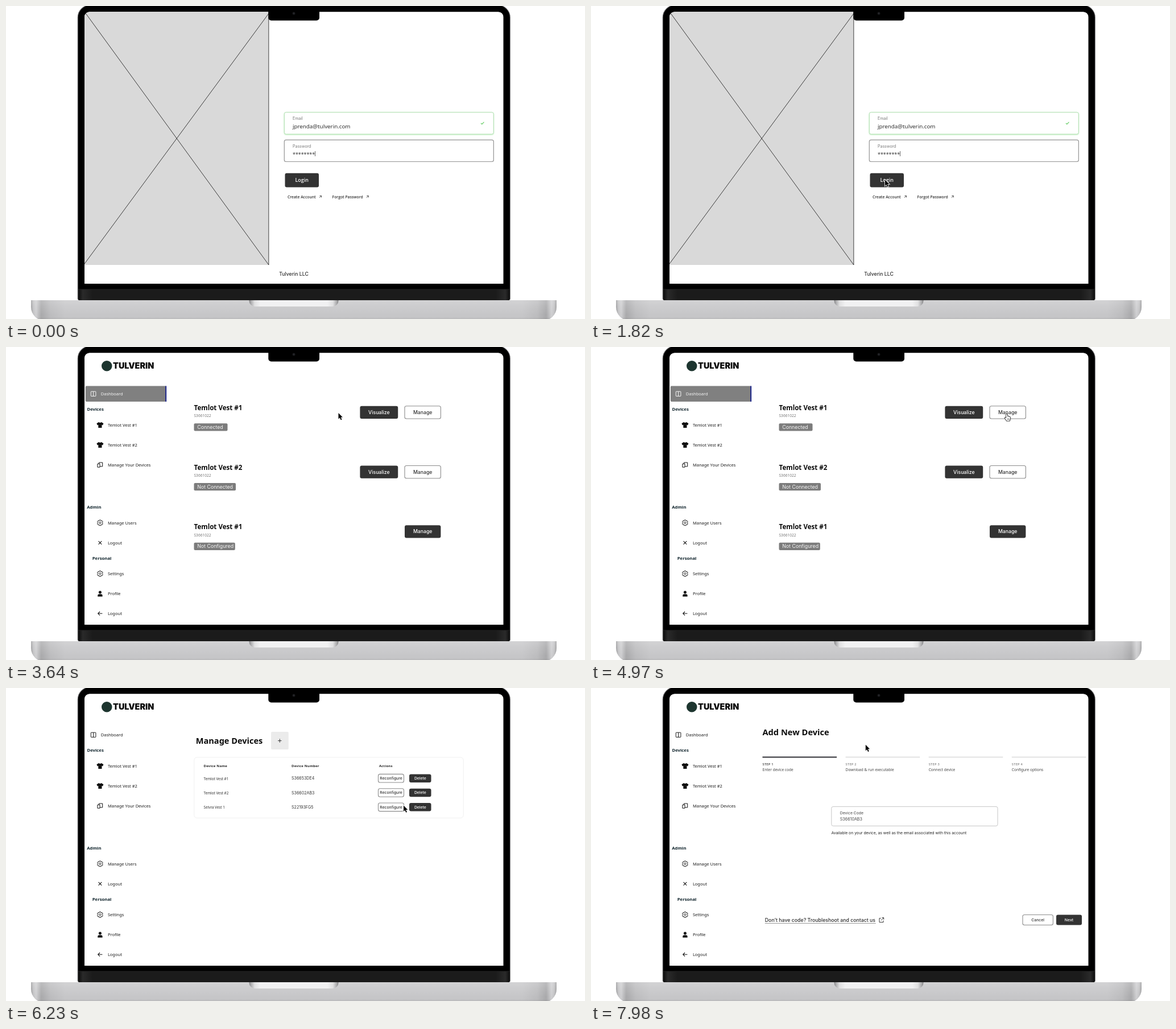
Recreate the animation shown at these times as an HTML page with a canvas. Size 1018 px wide and 550 px high, loop 8000 ms.

```html
<!DOCTYPE html>
<html lang="en">
<head>
<meta charset="utf-8">
<title>Device portal walkthrough</title>
<style>
html, body { margin: 0; width: 100%; height: 100%; overflow: hidden; background: #fff; }
canvas { display: block; width: 1018px; height: 550px; }
</style>
</head>
<body>
<canvas id="stage"></canvas>
<script>
const W = 1018, H = 550, LOOP = 8000, STEP = 70;
const canvas = document.getElementById('stage');
const ctx = canvas.getContext('2d');
const dpr = window.devicePixelRatio || 1;
canvas.width = W * dpr;
canvas.height = H * dpr;

const NOTO = '"Noto Sans", "Open Sans", sans-serif';
const OPEN = '"Open Sans", "Noto Sans", sans-serif';
const INTER = 'Inter, "Liberation Sans", sans-serif';
const DARK = '#333', INK = '#1c1c1c';
const VEST = 'Temlot Vest';

// ---- helpers ----
function text(str, x, y, size, { font = NOTO, weight = 400, color = INK, align = 'left', gap = 0 } = {}) {
  ctx.font = `${weight} ${size}px ${font}`;
  ctx.fillStyle = color;
  ctx.textAlign = align;
  ctx.letterSpacing = gap + 'px';
  ctx.fillText(str, x, y);
}

function box(x, y, w, h, r, fill, stroke, line = 1) {
  ctx.beginPath();
  ctx.roundRect(x, y, w, h, r);
  if (fill) { ctx.fillStyle = fill; ctx.fill(); }
  if (stroke) { ctx.strokeStyle = stroke; ctx.lineWidth = line; ctx.stroke(); }
}

function path(d, x, y, { fill, stroke, line = 1 } = {}) {
  const p = new Path2D(d);
  ctx.save();
  ctx.translate(x, y);
  if (stroke) { ctx.strokeStyle = stroke; ctx.lineWidth = line; ctx.stroke(p); }
  if (fill) { ctx.fillStyle = fill; ctx.fill(p); }
  ctx.restore();
}

// Horizontal gradient whose stops are mirrored about the middle.
function mirrored(x, w, stops) {
  const g = ctx.createLinearGradient(x, 0, x + w, 0);
  for (const [d, c] of stops) {
    g.addColorStop(d / w, c);
    g.addColorStop(1 - d / w, c);
  }
  return g;
}

function button(label, x, y, w, h, size, solid) {
  box(x, y, w, h, 3, solid ? DARK : '#fff', solid ? null : '#8c8c8c', 1.1);
  text(label, x + w / 2, y + h / 2 + size * 0.365, size,
    { font: INTER, weight: 500, color: solid ? '#fff' : DARK, align: 'center' });
}

// ---- laptop ----
function base() {
  const shape = [0, 0, 24, 24];
  box(44, 517, 924, 36, shape, mirrored(44, 924,
    [[0, '#98989a'], [4, '#c2c2c4'], [9, '#cfcfd1'], [18, '#a9a9ab'], [34, '#bcbcbe'], [60, '#c6c6c8']]));
  const v = ctx.createLinearGradient(0, 517, 0, 552);
  v.addColorStop(0, 'rgba(255,255,255,.22)');
  v.addColorStop(0.35, 'rgba(255,255,255,.1)');
  v.addColorStop(0.75, 'rgba(255,255,255,0)');
  v.addColorStop(1, 'rgba(0,0,0,.12)');
  box(44, 517, 924, 36, shape, v);
  box(427.5, 517, 157, 11, [0, 0, 10, 10], mirrored(427, 158,
    [[0, '#777'], [3, '#a5a5a7'], [10, '#e0e0e1'], [20, '#f1f1f2']]));
}

function lid() {
  box(125.7, -2, 761.1, 519, [22, 22, 3, 3], '#6f6f70');
  box(126.8, -1, 759, 518, [21, 21, 3, 3], '#000');
  box(127, 498, 758.5, 19, [0, 0, 3, 3], mirrored(127, 759, [[0, '#0b0b0b'], [8, '#2a2a2a'], [25, '#1b1b1b']]));
  box(127, 497.4, 758.5, 0.8, 0, '#2a2a2a');
  box(138, 10.2, 736.5, 477.8, [9, 9, 0, 0], '#fff');
}

function notch() {
  box(461.3, 6, 89.7, 19.5, [0, 0, 5, 5], '#000');
  box(503.5, 10.5, 5, 5, 2.5, '#191a1c');
  box(505, 12, 2, 2, 1, '#2c2d33');
}

// ---- login ----
function login() {
  ctx.save();
  ctx.beginPath();
  ctx.roundRect(138, 10.2, 736.5, 477.8, [9, 9, 0, 0]);
  ctx.clip();
  box(138, 10, 324, 445, 0, '#d9d9d9');
  path('M0 0L324 445M0 443L324 3M323.9 0V445', 138, 10, { stroke: '#111', line: 0.8 });
  ctx.restore();

  ctx.save();
  ctx.shadowColor = 'rgba(100,215,100,.5)';
  ctx.shadowBlur = 2.5 * dpr;
  ctx.shadowOffsetY = dpr;
  box(489.3, 186.8, 368, 38.4, 3, '#fff');
  ctx.restore();
  box(489.3, 186.8, 368, 38.4, 3, '#fff', '#a9dca9', 1);
  box(489.3, 235.3, 368, 38.2, 3, '#fff', '#939393', 1.2);

  const label = { font: INTER, color: '#777' };
  text('Email', 504, 200.4, 7, label);
  text('Password', 504, 248.7, 7, label);
  text('jprenda@tulverin.com', 504, 214.9, 9.75, { color: '#303030' });
  text('********', 504, 264.3, 8.9, { color: '#333', weight: 500 });
  box(543, 255, 0.8, 9, 0, '#444');
  path('M0 2.2L1.8 4L5.4 .2', 835, 203.6, { stroke: '#5fcb5f', line: 1.1 });

  box(490.5, 293.8, 59.5, 24.6, 3, DARK);
  text('Login', 520.2, 309.2, 8.9, { font: OPEN, color: '#fff', weight: 600, align: 'center' });
  const link = { font: OPEN, color: '#333', weight: 600 };
  text('Create Account', 495, 337.9, 6.75, link);
  text('Forgot Password', 573.6, 337.9, 6.75, link);
  for (const x of [551, 633.8])
    path('M0 3.6L3.4 .3M.5 .2H3.5V3.3', x, 333.3, { stroke: '#333', line: 0.8 });
  text('Tulverin LLC', 506, 473.8, 8.7, { font: INTER, weight: 500, color: '#2b2b2b', align: 'center' });
}

// ---- sidebar ----
const SHIRT = 'M-2.2 -5Q0 -3.2 2.2 -5L6 -2.7L4.7 .4L3.1 -.2V5H-3.1V-.2L-4.7 .4L-6 -2.7Z';
const icons = {
  shirt: (x, y) => path(SHIRT, x, y, { fill: '#111' }),
  devices: (x, y) => path('M-2 -4.2H4.3V2.7H-.3M-4.5 -1.9H-.4V4H-4.5ZM-2 -4.2V-2', x, y, { stroke: '#111' }),
  gear(x, y) {
    path('M-1.3 -4.8H1.3L1.8 -3.3L3.6 -3.6L4.8 -1.4L3.7 0L4.8 1.4L3.6 3.6L1.8 3.3L1.3 4.8H-1.3L-1.8 3.3L-3.6 3.6L-4.8 1.4L-3.7 0L-4.8 -1.4L-3.6 -3.6L-1.8 -3.3Z',
      x, y, { stroke: '#151515' });
    box(x - 1.6, y - 1.6, 3.2, 3.2, 1.6, null, '#151515', 0.9);
  },
  cross: (x, y) => path('M-2.8 -2.8L2.8 2.8M2.8 -2.8L-2.8 2.8', x, y, { stroke: '#151515', line: 1.1 }),
  person(x, y) {
    box(x - 2.5, y - 5, 5, 5, 2.5, '#111');
    box(x - 4.2, y + 0.7, 8.4, 4.2, [2.5, 2.5, 0.5, 0.5], '#111');
  },
  back: (x, y) => path('M4 0H-3.6M-.4 -3.3L-3.7 0L-.4 3.3', x, y, { stroke: '#151515', line: 1.1 })
};
const menu = [
  ['shirt', VEST + ' #1', 136.8], ['shirt', VEST + ' #2', 171.9], ['devices', 'Manage Your Devices', 207],
  ['gear', 'Manage Users', 308.7], ['cross', 'Logout', 343.8], ['gear', 'Settings', 398.1],
  ['person', 'Profile', 433.3], ['back', 'Logout', 468.1]
];

function sidebar(active) {
  box(168, 24, 18.5, 18.5, 9.25, '#1d352f');
  text('TULVERIN', 188, 38.4, 14.4, { font: INTER, weight: 900, color: '#0b0b0b' });
  if (active) {
    box(139.7, 68.5, 142, 27.5, 2, '#808080');
    box(280, 68.5, 2.2, 27.5, 0, '#27308c');
  }
  const c = active ? '#f4f4f4' : INK;
  box(149.3, 78.2, 8.6, 8.2, 0.5, null, c, 1);
  path('M0 0V8.2', 153.6, 78.2, { stroke: c });
  text('Dashboard', 166.8, 85.1, 7.5, { color: c });
  for (const [icon, label, y] of menu) {
    icons[icon](165.4, y + 0.2);
    text(label, 178.9, y + 2.8, 7.5);
  }
  const head = { weight: 700, color: '#10242c' };
  text('Devices', 142.4, 112.4, 7.75, head);
  text('Admin', 142.2, 284.2, 7.75, head);
  text('Personal', 151.7, 373.7, 7.75, head);
}

// ---- pages ----
function dashboard() {
  sidebar(true);
  const rows = [['#1', 'Connected', 59], ['#2', 'Not Connected', 73.5], ['#1', 'Not Configured', 72.3]];
  rows.forEach(([num, state, w], i) => {
    const y = i * 104.7;
    text(`${VEST} ${num}`, 330.5, y + 111, 11.6, { weight: 700, color: '#0c0c0c' });
    text('S3661022', 330.5, y + 123.4, 6.6, { color: '#777' });
    box(330.5, y + 134.3, w, 13.2, 2, '#7c7c7c');
    text(state, 336.2, y + 144, 8.8, { font: INTER, color: '#f4f4f4' });
    if (i < 2) button('Visualize', 622.4, y + 103.8, 66.8, 22.2, 8.7, true);
    button('Manage', 701, y + 103.8, 63.4, 22.2, 8.7, i === 2);
  });
}

function devices() {
  sidebar(false);
  text('Manage Devices', 333.8, 98, 14.55, { weight: 700, color: '#0c0c0c' });
  box(466, 77, 30.8, 31, 2, '#ebebeb');
  path('M-3.2 0H3.2M0 -3.2V3.2', 481.3, 92.6, { stroke: '#222', line: 0.9 });
  box(330.8, 121.8, 473.4, 106.6, 5, '#fff', '#f0f0f0');
  const head = { weight: 700, color: '#222', gap: 0.2 };
  text('Device Name', 347.6, 139, 6, head);
  text('Device Number', 502, 139, 6, head);
  text('Actions', 656, 139, 6, head);
  const rows = [[VEST + ' #1', 'S36653DE4'], [VEST + ' #2', 'S36602AB3'], ['Selvra Vest 1', 'S22193FG5']];
  rows.forEach(([name, code], i) => {
    const y = 158.7 + i * 25.3;
    text(name, 347.6, y + 3, 6.3, { color: '#333' });
    text(code, 502, y + 2.5, 7.1, { font: INTER, color: '#333' });
    button('Reconfigure', 654.5, y - 7.3, 45, 14.6, 6.75, false);
    button('Delete', 709, y - 7.3, 38.5, 14.6, 6.75, true);
  });
}

function addDevice() {
  sidebar(false);
  text('Add New Device', 301.5, 82.8, 14.65, { weight: 700, color: '#0c0c0c' });
  const steps = ['Enter device code', 'Download & run executable', 'Connect device', 'Configure options'];
  steps.forEach((label, i) => {
    const x = 301.5 + i * 146.1;
    box(x, 120.4, 130.6, 2, 0, i ? '#e2e2e2' : '#2f2f35');
    text('STEP ' + (i + 1), x, 136.4, 5.6, { font: OPEN, weight: 600, color: i ? '#808080' : '#333', gap: 0.3 });
    text(label, x, 145.6, 6.55, { color: '#444' });
  });
  box(422.8, 208.4, 292.2, 34, 3, '#fff', '#c6c6c6');
  text('Device Code', 437.8, 221.5, 6.8, { font: INTER, color: '#444' });
  text('S36610AB3', 437.8, 233.4, 7.1, { font: INTER, color: '#444' });
  text('Available on your device, as well as the email associated with this account', 422.5, 257.3, 6.8,
    { font: INTER, color: '#222' });
  text('Don’t have code? Troubleshoot and contact us', 305.8, 410.8, 8.75,
    { font: INTER, weight: 500, color: '#2b2b2b' });
  box(305.8, 413, 195, 0.8, 0, '#777');
  path('M3 1H.3V8H7.3V5M3.2 4.8L7.8 .2M4.8 0H8V3.2', 506.7, 403.6, { stroke: '#222', line: 0.9 });
  button('Cancel', 759, 398.5, 53.4, 18, 6.85, false);
  button('Next', 818, 398.5, 45, 18, 6.85, true);
}

// ---- pointer: time, x, y ----
const keys = [
  [70, 850, 497], [840, 517, 304], [1050, 517, 304], [1190, 517, 305.5], [2800, 517, 305.5],
  [3150, 365, 205], [3640, 584.5, 116], [3780, 584.5, 116], [4200, 726, 134.5], [4340, 726, 134.5],
  [4690, 731, 117.5], [5530, 731, 117.5], [6020, 708, 208], [6230, 699, 206.5], [6370, 659.5, 200],
  [6790, 482, 98], [7630, 482, 98], [7980, 482.8, 99.8]
];

function slope(i, k) {
  const a = keys[i - 1], b = keys[i], c = keys[i + 1];
  if (!a || !c || a[k] === b[k] || b[k] === c[k]) return 0;
  const p = (b[k] - a[k]) / (b[0] - a[0]), q = (c[k] - b[k]) / (c[0] - b[0]);
  return p * q <= 0 ? 0 : 2 * p * q / (p + q);
}

function pointerAt(t) {
  const i = Math.max(1, keys.findIndex(k => k[0] >= t));
  const a = keys[i - 1], b = keys[i], d = b[0] - a[0], u = (t - a[0]) / d;
  return [1, 2].map(k => {
    const ease = u * u * (3 - 2 * u);
    return a[k] + (b[k] - a[k]) * ease
      + d * u * (1 - u) * ((1 - u) * slope(i - 1, k) - u * slope(i, k));
  });
}

const ARROW = 'M0 0V10.4L2.4 8.2L4.2 12.3L6 11.5L4.2 7.5H7.4Z';
const HAND = 'M-.9 .7Q0 -.7 1 .7V4.4Q2 3.6 2.8 4.8Q3.9 4.2 4.5 5.3Q5.8 4.9 6 6.4V9Q5.6 10.6 4.9 12.3H-.1Q-1.8 9.5 -3.3 7.7Q-3.5 6.1 -2 6.6L-.9 7.7Z';

function ripple(t, start, x, y) {
  const u = (t - start) / 350;
  if (u < 0 || u >= 1) return;
  ctx.globalAlpha = 0.4 * (1 - u);
  const r = 5 + 22 * u;
  box(x - r, y - r, 2 * r, 2 * r, r, null, '#888', 1.2);
  ctx.globalAlpha = 1;
}

function pointer(t) {
  if (t < 70) return;
  ripple(t, 1470, 517, 306);
  ripple(t, 6790, 482, 97.5);
  const [x, y] = pointerAt(t);
  if (t >= 4550 && t < 5040) {
    path(HAND, x, y, { fill: '#fff', stroke: '#111', line: 1.6 });
    path('M1.3 8V10.5M2.8 8V10.5M4.2 8V10.5', x, y, { stroke: '#333', line: 0.6 });
  } else {
    path(ARROW, x, y, { fill: '#000', stroke: '#fff', line: 1.6 });
  }
}

function draw(t) {
  ctx.setTransform(dpr, 0, 0, dpr, 0, 0);
  ctx.fillStyle = '#fff';
  ctx.fillRect(0, 0, W, H);
  base();
  lid();
  (t < 1960 ? login : t < 5040 ? dashboard : t < 7280 ? devices : addDevice)();
  notch();
  pointer(t);
}

function tick() {
  const t = performance.now() % LOOP;
  draw(Math.floor(t / STEP) * STEP);
  requestAnimationFrame(tick);
}
tick();
</script>
</body>
</html>
```
